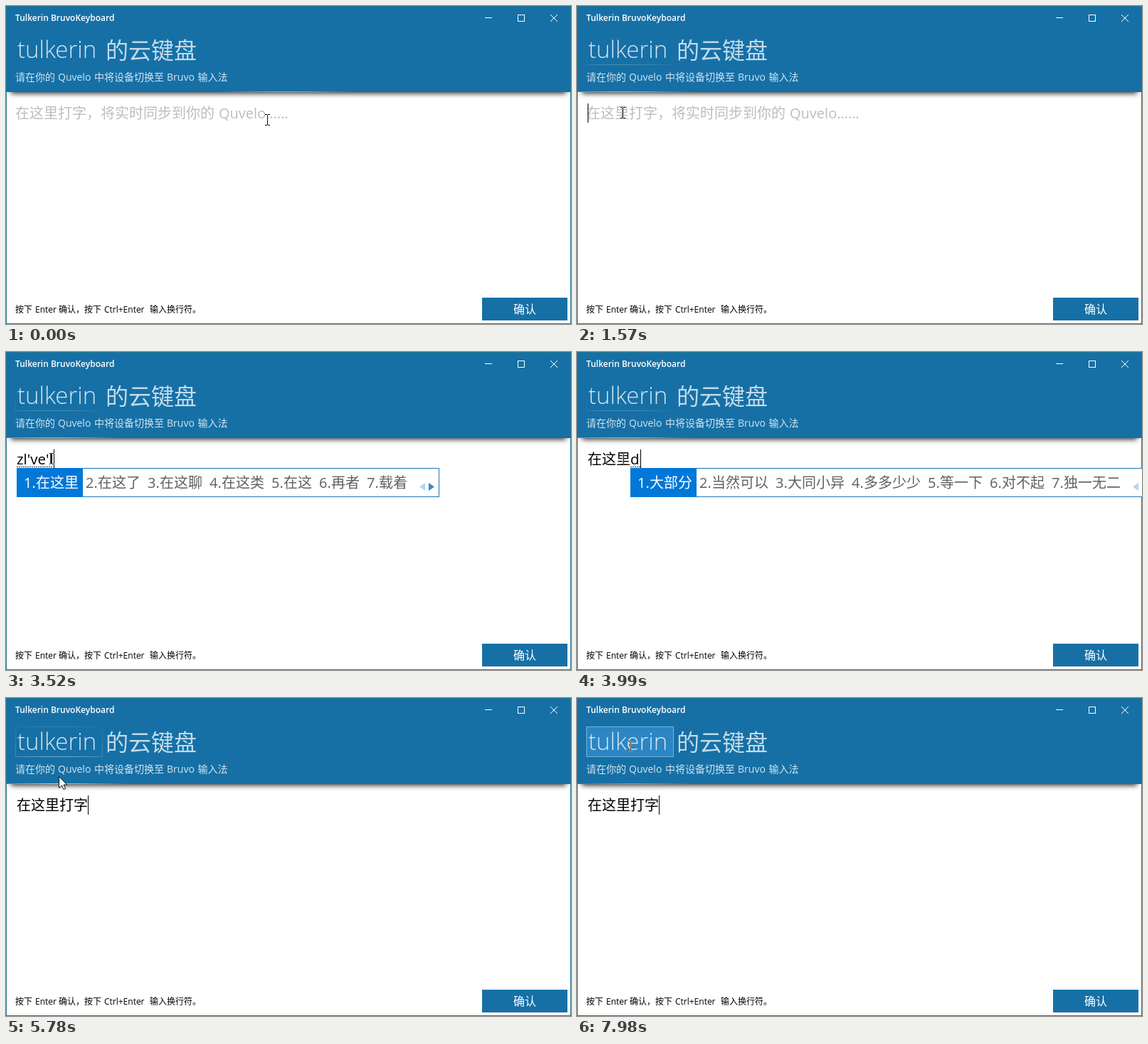
An HTML page with a canvas that plays this animation: 794x447 px, repeating every 8 s.

```html
<!DOCTYPE html>
<html lang="zh-CN">
<head>
<meta charset="utf-8">
<title>Keyboard window</title>
<style>
html, body { margin: 0; width: 100%; height: 100%; overflow: hidden; background: #fff; }
canvas { display: block; }
</style>
</head>
<body>
<canvas id="stage" width="794" height="447"></canvas>
<script>
const W = 794, H = 447, LOOP = 8000;
const BLUE = '#1670a6', ACCENT = '#0078d7', EDGE = '#217590';
const FONTS = '"Open Sans", "Noto Sans CJK SC", "Noto Sans CJK", sans-serif';
const ctx = document.getElementById('stage').getContext('2d');

// Pointer path: time, x, y
const PATH = [
  [-90, 394, 162], [0, 367, 160], [300, 265, 153], [600, 135, 147], [870, 72, 145],
  [1110, 64, 150], [5390, 64, 150], [5600, 70, 128], [5780, 74, 110], [6110, 74, 107],
  [6410, 74, 107], [6700, 136, 92], [6900, 118, 55], [7040, 93, 37], [7280, 90, 53],
  [7600, 84, 60], [7980, 75, 68], [8000, 75, 68]
];

// Each edit: time, committed text, text being composed, candidate list
const CANDIDATES = {
  z: '在那里 怎么回事 左右为难 自由自在 在一起 最重要 再接再厉',
  zai: '在这里 在这了 在这聊 在这类 在这 再者 载着',
  d: '大部分 当然可以 大同小异 多多少少 等一下 对不起 独一无二',
  da: '打字 大字 搭子 达子 大紫 鞑子 沓子'
};
const EDITS = [
  [0, '', '', ''],
  [2960, '', 'z', 'z'], [3050, '', 'zl', 'z'], [3280, '', "zl'v", 'zai'],
  [3450, '', "zl've", 'zai'], [3520, '', "zl've'l", 'zai'], [3690, '', "zl've'li", 'zai'],
  [3840, '在这里', '', ''], [3990, '在这里', 'd', 'd'], [4070, '在这里', 'da', 'd'],
  [4220, '在这里', "da'z", 'da'], [4390, '在这里', "da'zi", 'da'],
  [4710, '在这里打字', '', '']
];
const BLINKS = [510, 1040, 1570, 2030, 2580, 5320, 5730, 6260, 6790, 7320, 7850];

function rect(x, y, w, h, color) {
  ctx.fillStyle = color;
  ctx.fillRect(x, y, w, h);
}

function text(str, x, y, size, color, weight = 400) {
  ctx.font = `${weight} ${size}px ${FONTS}`;
  ctx.fillStyle = color;
  ctx.fillText(str, x, y);
  return ctx.measureText(str).width;
}

// Draws a line of mixed scripts, each run starting at its own x.
function runs(parts, y, size, color) {
  parts.forEach(([x, str]) => text(str, x, y, size, color));
}

function polygon(points, fill, stroke) {
  ctx.beginPath();
  points.forEach(([x, y]) => ctx.lineTo(x, y));
  ctx.closePath();
  ctx.fillStyle = fill;
  ctx.fill();
  if (stroke) {
    ctx.strokeStyle = stroke;
    ctx.stroke();
  }
}

function pointerAt(t) {
  const i = Math.max(1, PATH.findIndex(p => p[0] >= t));
  const [t0, x0, y0] = PATH[i - 1], [t1, x1, y1] = PATH[i];
  const k = (t - t0) / (t1 - t0);
  return { x: Math.round(x0 + (x1 - x0) * k), y: Math.round(y0 + (y1 - y0) * k) };
}

function glow({ x, y }, alpha) {
  const g = ctx.createRadialGradient(x, y, 0, x, y, 100);
  g.addColorStop(0, `rgba(255,255,255,${alpha})`);
  g.addColorStop(1, 'rgba(255,255,255,0)');
  return g;
}

function drawHeader(light, hover) {
  ctx.save();
  ctx.shadowColor = 'rgba(0,0,0,.8)';
  ctx.shadowBlur = 7;
  ctx.shadowOffsetY = 2;
  rect(7, 20, W - 14, 101, BLUE);
  ctx.restore();
  rect(0, 0, W, 121, BLUE);
  rect(1, 120, W - 2, 1, glow(light, 0.75));

  text('Tulkerin BruvoKeyboard', 13, 21, 12, '#fff', 600);
  ctx.strokeStyle = '#fff';
  ctx.lineWidth = 1;
  ctx.strokeRect(719.5, 12.5, 9, 9);
  ctx.beginPath();
  ctx.moveTo(673, 16.5); ctx.lineTo(683, 16.5);
  ctx.moveTo(765, 12); ctx.lineTo(775, 22);
  ctx.moveTo(775, 12); ctx.lineTo(765, 22);
  ctx.stroke();

  if (hover) rect(13, 40, 123, 43, '#2b86c3');
  ctx.strokeStyle = hover ? '#72b3df' : glow(light, 0.65);
  ctx.strokeRect(13.5, 40.5, 122, 42);
  const pale = '#d3e5f0';
  text('tulkerin', 16, 73, 33, pale, 300);
  text('的云键盘', 140, 74, 32, '#c3dbe9', 300);
  runs([[13, '请在你的'], [73, 'Quvelo'], [124, '中将设备切换至'], [226, 'Bruvo'], [269.5, '输入法']],
    105, 14, pale);
}

function drawFooter() {
  runs([[13, '按下'], [41, 'Enter'], [74, '确认，按下'], [138, 'Ctrl+Enter'], [202, '输入换行符。']],
    431, 12, '#000');
  rect(669, 410, 120, 32, BLUE);
  text('确认', 713, 432, 16, '#fff');
}

function drawFrame() {
  ctx.strokeStyle = EDGE;
  ctx.strokeRect(0.5, 0.5, W - 1, H - 1);
}

function drawCandidates(x, list) {
  const items = list.split(' ');
  const step = item => 27 + 20 * item.length;
  const width = items.reduce((sum, item) => sum + step(item), 45);
  const right = x + width;
  rect(x, 163, width, 41, '#fff');
  ctx.strokeStyle = '#1b76b8';
  ctx.strokeRect(x + 0.5, 163.5, width - 1, 40);
  rect(x, 163, step(items[0]) + 6, 41, ACCENT);
  let left = x + 10;
  items.forEach((item, i) => {
    runs([[left, `${i + 1}.`], [left + 17, item]], 191, 20, i ? '#606060' : '#fff');
    left += step(item);
  });
  polygon([[right - 28, 189.5], [right - 20, 184], [right - 20, 195]], '#b5d5ec');
  polygon([[right - 7, 189.5], [right - 15, 184], [right - 15, 195]], '#3289ca');
}

function drawEditor(t) {
  const [time, done, composing, list] = EDITS.filter(e => e[0] <= t).pop();
  if (!done && !composing) {
    runs([[13, '在这里打字，将实时同步到你的'], [299, 'Quvelo……']], 158, 20, '#bdbdbd');
  }
  const start = 15 + 20 * done.length;
  text(done, 15, 158, 20, '#000');
  const caret = Math.round(start + text(composing, start, 158, 20.5, '#000') + (composing ? 1 : 0));
  for (let x = start; composing && x < caret - 1; x += 3) rect(x, 161, 2, 1, '#333');

  // The caret starts hidden, and any typing shows it again.
  const flips = BLINKS.filter(b => b > time && b <= t).length;
  if ((flips % 2 === 0) === (time > 0)) rect(caret, 137, 1, 27, '#000');
  if (list) drawCandidates(start, CANDIDATES[list]);
}

function drawBeam({ x, y }) {
  ctx.save();
  ctx.globalCompositeOperation = 'difference';
  rect(x, y - 7, 1, 14, '#fff');
  for (const edge of [y - 8, y + 7]) {
    rect(x - 3, edge, 3, 1, '#fff');
    rect(x + 1, edge, 3, 1, '#fff');
  }
  ctx.restore();
}

function drawArrow({ x, y }) {
  ctx.save();
  ctx.translate(x + 0.5, y + 0.5);
  polygon([[0, 0], [0, 16], [4, 12.5], [6.5, 18], [9, 17], [6.5, 11.5], [11.5, 11.5]], '#fff', '#111');
  ctx.restore();
}

function draw(t) {
  const pointer = pointerAt(t);
  const hover = t > 7060;
  rect(0, 0, W, H, '#fff');
  drawHeader(pointerAt(t - 90), hover);
  drawFrame();
  drawFooter();
  drawEditor(t);
  if (hover || pointer.y > 121) drawBeam(pointer);
  else drawArrow(pointer);
}

const began = performance.now();
function tick() {
  draw((performance.now() - began) % LOOP);
  requestAnimationFrame(tick);
}
tick();
</script>
</body>
</html>
```
